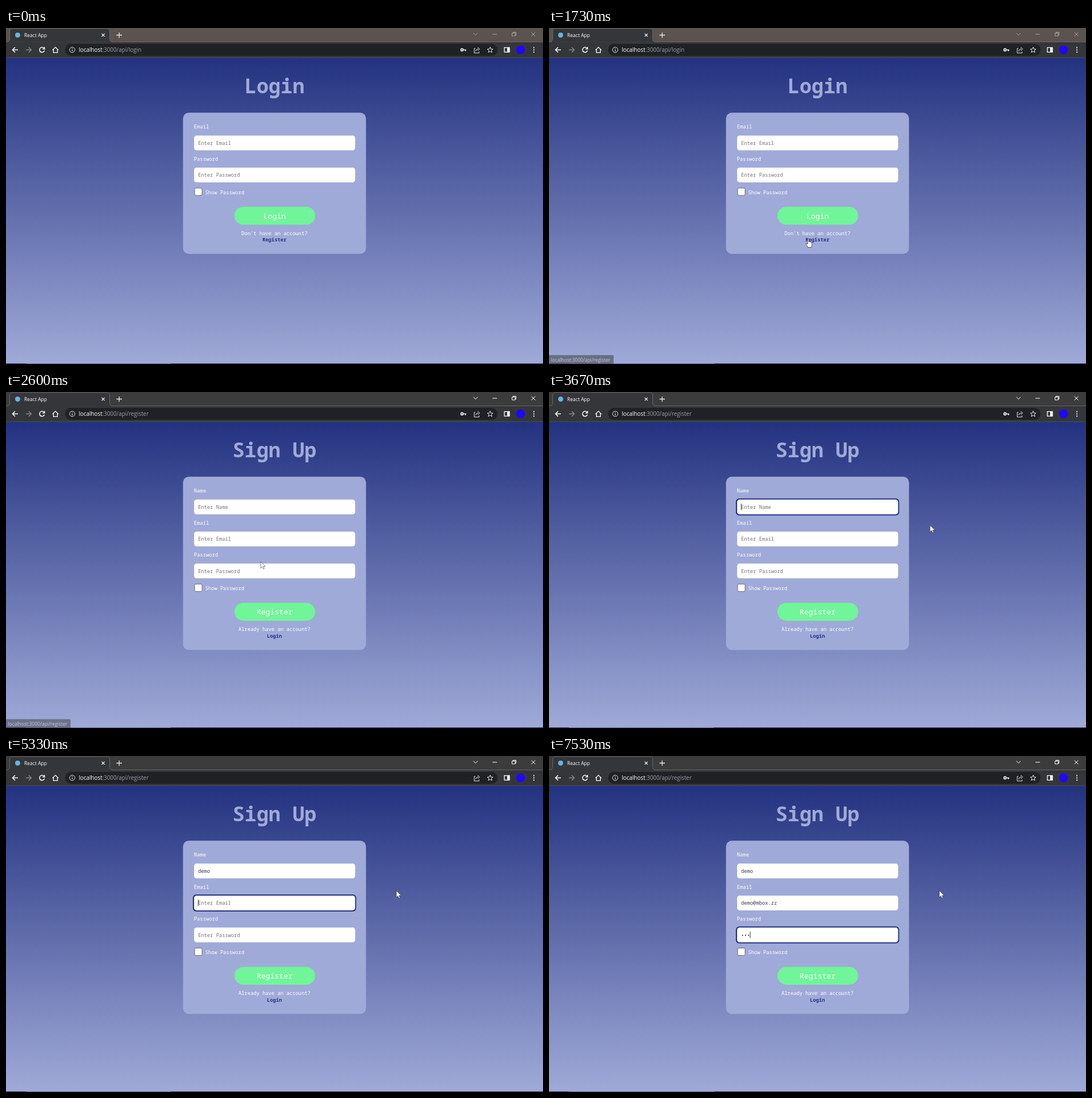
An HTML page for the animation above (8 s loop, 945x592 px).

```html
<!DOCTYPE html>
<html lang="en">
<head>
<meta charset="utf-8">
<title>Sign up flow</title>
<style>
html, body { margin: 0; width: 100%; height: 100%; overflow: hidden; background: #24337f; }
svg { display: block; }
text { font: 8.8px "Noto Sans Mono", monospace; fill: #fff; white-space: pre; }
.ui { font-family: "Open Sans", sans-serif; }
.title { font-size: 35.2px; font-weight: 700; fill: #a0aad8; }
.go { font-size: 13.2px; }
.mid { text-anchor: middle; }
.link { font-weight: 700; fill: #253480; }
.icon { fill: none; stroke: #e8eaed; stroke-width: 1.3; }
</style>
</head>
<body>
<svg width="945" height="592" viewBox="0 0 945 592">
  <defs>
    <linearGradient id="sky" x2="0" y2="1">
      <stop stop-color="#233280"/><stop offset="1" stop-color="#a0aad8"/>
    </linearGradient>
  </defs>
  <rect y="52" width="945" height="540" fill="url(#sky)"/>
  <rect y="591" width="945" height="1" fill="#20243c"/>
  <rect x="35" y="591" width="255" height="1" fill="#5d648e"/>

  <!-- browser chrome -->
  <rect id="frame" width="945" height="26"/>
  <rect y="24.5" width="945" height="28" fill="#35363a"/>
  <path d="M0 24.5H1Q6.5 24.5 6.5 19V6Q6.5 1 11.5 1H177Q182.500 1 182.500 6V19Q182.500 24.500 188 24.500H945"
        fill="#35363a" stroke="#77736f" stroke-width=".8"/>
  <path d="M0 52.200H945" stroke="#55565b" stroke-width=".8"/>
  <rect x="104" y="28" width="761" height="21" rx="10.500" fill="#202124"/>
  <circle cx="20.500" cy="12.500" r="4.500" fill="#61b8dc"/>
  <text class="ui" x="32" y="16" style="font-size:8.55px">React App</text>
  <text class="ui" x="128" y="42.300" style="font-size:9.9px">localhost<tspan id="path" fill="#9aa0a6"></tspan></text>
  <g class="icon">
    <path d="M168.500 10L173.500 15M173.500 10L168.500 15M194.500 12.500H204M199.200 8V17.300"/>
    <path d="M21 38.500H11.500M16 34L11.500 38.500 16 43" stroke="#fff" stroke-width="1.500"/>
    <path d="M35 38.500H44.500M40 34L44.500 38.500 40 43" stroke="#85868a" stroke-width="1.500"/>
    <path d="M66.800 35.600A4.400 4.400 0 1 0 67.600 39.800M67.800 33.500V37H64.300" stroke="#fff" stroke-width="1.500"/>
    <path d="M81.800 39L87 33.800 92.200 39M83.500 37.500V43.300H90.500V37.500" stroke="#fff"/>
    <circle cx="116.500" cy="38.500" r="4.700" stroke-width="1"/>
    <path d="M116.500 38V41.300M116.500 35.700V36.900" stroke-width="1.100"/>
    <path d="M826 36H824V44H832.500V41.500M826.500 41Q827 37 831 37M830 34L833.500 37 830 40" stroke-width="1"/>
    <path d="M852 33.600L853.400 37 857 37.200 854.200 39.500 855.200 43.100 852 41.100 848.800 43.100 849.800 39.500 847 37.200 850.600 37Z" stroke-width="1"/>
    <rect x="877" y="34.500" width="9" height="8" stroke="#fff"/>
    <path d="M884 34.500V42.500" stroke="#fff" stroke-width="4"/>
    <path d="M929 33.500V35.500M929 37.500V39.500M929 41.500V43.500" stroke-width="2"/>
  </g>
  <g id="key" class="icon">
    <circle cx="802.500" cy="38.500" r="2" stroke-width="1.800"/>
    <path d="M805 38.500H810M808.500 38.500V41" stroke-width="1.700"/>
  </g>
  <circle cx="905.500" cy="38.500" r="7.800" fill="#1f08fa"/>
  <path id="controls" class="icon" style="stroke-width:1"
        d="M822.500 9L826.300 12.500 830 9M856 11H864M890.500 9H896V14H890.500ZM892 9V7.500H897.500V12.500H896M924.500 7.500L931.500 14.500M931.500 7.500L924.500 14.500"/>

  <g id="login"></g>
  <g id="signup"></g>
  <path id="caret" stroke="#222" stroke-width=".9"/>

  <g id="status">
    <path d="M0 576.500H111.500Q113.500 576.500 113.500 578.500V592H0Z" fill="#3b3c3f" stroke="#5b5c60" stroke-width=".6"/>
    <text class="ui" x="3.500" y="587.500" style="font-size:8.4px;fill:#e4e5e8">localhost:3000/api/register</text>
  </g>
  <g id="cursor" stroke-linejoin="round">
    <path id="arrow" d="M0 0V11.500L2.700 9 4.500 13 6.300 12.200 4.600 8.300H8.200Z" fill="#fff" stroke="#333" stroke-width=".6"/>
    <path id="hand" fill="#fff" stroke="#222" stroke-width=".7"
          d="M-.8 1Q.3 -.5 1.300 1V6Q2.300 4.800 3.200 6.200 4.300 5.300 5 6.700 6.500 6.200 6.700 8V12Q6 13.500 5.500 15.500H-.3Q-1 13.500 -2.500 11.700L-4 9.300Q-3.500 7.700 -2 8.800L-.8 10Z"/>
    <path id="beam" d="M-2 -6.500H2M0 -6.500V6.500M-2 6.500H2" stroke="#222" stroke-width=".9"/>
  </g>
</svg>
<script>
const LOOP = 8000, ROW = 56.4, CHAR = 5.28;
const $ = id => document.getElementById(id);
const show = (el, on) => el.setAttribute("visibility", on ? "visible" : "hidden");
const ramp = (t, a, b) => Math.min(1, Math.max(0, (t - a) / (b - a)));
const text = (x, y, s, cls = "", more = "") => `<text x="${x}" y="${y}" class="${cls}" ${more}>${s}</text>`;

function buildForm(el, { title, fields, button, question, link }) {
  const d = ROW * (fields.length - 2);
  const row = (name, i) => {
    const y = ROW * i;
    return text(330.8, 177.3 + y, name) +
      `<rect class="ring" x="328.800" y="${187.5 + y}" width="287.500" height="30" rx="6" fill="#253480" opacity="0"/>
       <rect x="331" y="${189.5 + y}" width="283.400" height="26" rx="4.500" fill="#fff"/>` +
      text(338, 205.7 + y, "Enter " + name, "value", 'style="fill:#757575"');
  };
  el.innerHTML = text(472.6, 115, title, "title mid") +
    `<rect x="311.500" y="149.300" width="322" height="${248.7 + d}" rx="10" fill="#a0aad8"/>` +
    fields.map(row).join("") +
    `<rect x="332" y="${282 + d}" width="13" height="13" rx="2" fill="#fff" stroke="#6b6b70"/>` +
    text(350.6, 293 + d, "Show Password") +
    `<rect x="402" y="${315 + d}" width="142" height="31.500" rx="15.700" fill="#70f598"/>` +
    text(472.7, 335.5 + d, button, "go mid") +
    text(472.4, 365 + d, question, "mid") +
    text(472.4, 376.3 + d, link, "mid link");
}

buildForm($("login"), {
  title: "Login", fields: ["Email", "Password"], button: "Login",
  question: "Don't have an account?", link: "Register"
});
buildForm($("signup"), {
  title: "Sign Up", fields: ["Name", "Email", "Password"], button: "Register",
  question: "Already have an account?", link: "Login"
});
const rings = $("signup").querySelectorAll(".ring");
const values = $("signup").querySelectorAll(".value");

// Each field: focus time, blur time, value, and when it grows to how many characters.
const inputs = [
  { hint: "Enter Name", from: 3330, to: 5130, value: "demo", keys: [[4270, 1], [4530, 2], [4730, 3], [4800, 4]] },
  { hint: "Enter Email", from: 5130, to: 6530, value: "demo@mbox.zz", keys: [[5930, 12]] },
  { hint: "Enter Password", from: 6530, to: LOOP, value: "•••", keys: [[7070, 1], [7270, 2], [7530, 3]] }
];
const blinks = [[5600, 5930], [6470, 6530]];

// Pointer stops: time, x, y
const stops = [
  [670, 664, 62], [1000, 592, 178], [1270, 492, 326], [1470, 456, 371],
  [2470, 456, 371], [2600, 448, 299], [2670, 466, 293], [2730, 490, 293],
  [2830, 490, 293], [3130, 531, 203], [3300, 531, 203],
  [3470, 585, 220], [3670, 670.5, 235], [3870, 687, 237.5]
];

function pointer(t) {
  const i = stops.findIndex(s => s[0] > t);
  if (i < 0) return stops[stops.length - 1].slice(1);
  if (i === 0) return stops[0].slice(1);
  const [a, b] = [stops[i - 1], stops[i]], k = ramp(t, a[0], b[0]);
  return [a[1] + (b[1] - a[1]) * k, a[2] + (b[2] - a[2]) * k];
}

function drawPointer(t, rows) {
  const [x, y] = pointer(t);
  const overField = x > 331 && x < 614 && y > 189 && y < 189 + ROW * rows && (y - 189) % ROW < 26.5;
  const overLink = t < 2170 && x > 402 && x < 544 && (y > 315 && y < 346 || y > 368);
  const kind = overField ? "beam" : overLink ? "hand" : "arrow";
  $("cursor").setAttribute("transform", `translate(${x} ${y})`);
  for (const id of ["arrow", "hand", "beam"]) show($(id), t >= 670 && id === kind);
}

function drawInputs(t) {
  let caret = "";
  inputs.forEach((f, i) => {
    const n = f.keys.reduce((last, [at, count]) => t >= at ? count : last, 0);
    values[i].textContent = n ? f.value.slice(0, n) : f.hint;
    values[i].style.fill = n ? "#333a4d" : "#757575";
    const fadeOut = f.to < LOOP ? ramp(t, f.to, f.to + 130) : 0;
    rings[i].setAttribute("opacity", ramp(t, f.from - 60, f.from + 130) * (1 - fadeOut));
    if (t >= f.from && t < f.to) caret = `M${338.2 + n * CHAR} ${196.5 + ROW * i}v11.500`;
  });
  $("caret").setAttribute("d", caret);
  show($("caret"), caret && !blinks.some(([a, b]) => t >= a && t < b));
}

function draw(now) {
  const t = now % LOOP, active = t >= 2130, registering = t >= 2270;
  $("frame").setAttribute("fill", active ? "#3c3c3c" : "#5b5350");
  $("controls").style.stroke = active ? "#fff" : "#a9a4a1";
  $("path").textContent = ":3000/api/" + (registering ? "register" : "login");
  show($("key"), t < 4270 || t >= 7070);
  $("login").style.display = registering ? "none" : "";
  $("signup").style.display = registering ? "" : "none";
  $("status").setAttribute("opacity", ramp(t, 1500, 1930) * (1 - ramp(t, 2470, 2730)));
  drawInputs(t);
  drawPointer(t, registering ? 3 : 2);
}

const start = performance.now();
function tick() {
  draw(performance.now() - start);
  requestAnimationFrame(tick);
}
tick();
</script>
</body>
</html>
```
